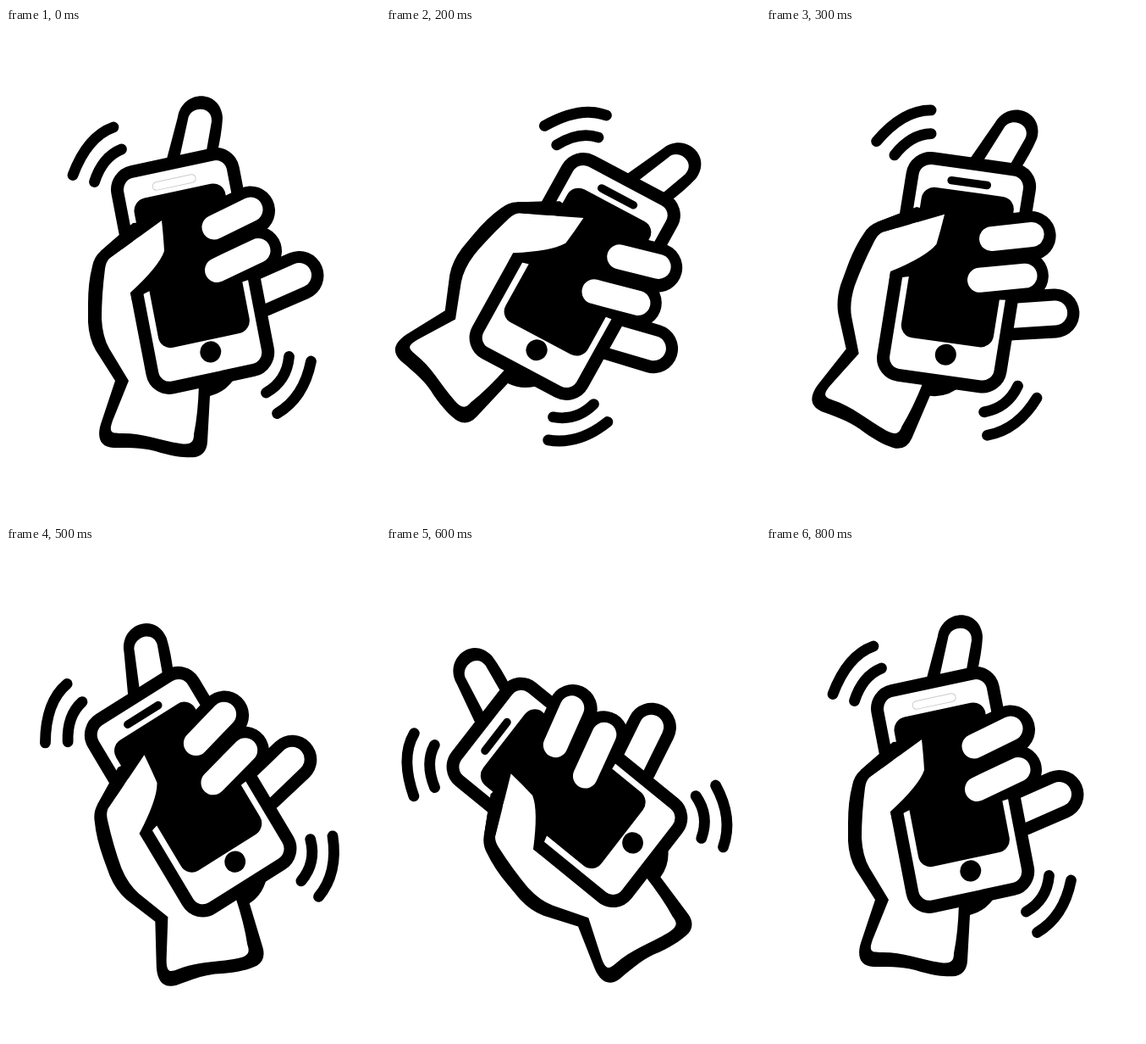
These frames come from a looping animation (442x579 px, 0.9 s). An HTML page:

```html
<!DOCTYPE html>
<html lang="en">
<head>
<meta charset="utf-8">
<title>Shaking phone</title>
<style>
  html, body { margin: 0; width: 100%; height: 100%; overflow: hidden; background: #fff; }
  svg { display: block; width: 442px; height: 579px; }
  .line { fill: none; stroke: #000; stroke-linecap: round; }
  .outer { stroke-width: 58; }
  .inner { stroke: #fff; stroke-width: 29; }
  .wave { stroke-width: 12.8; }
  .white { fill: #fff; }
</style>
</head>
<body>
<svg viewBox="0 0 442 579">
  <g id="figure">
    <!-- motion marks -->
    <g class="line wave">
      <path d="M127 117Q96 128 79 173.5"/>
      <path d="M136.5 143Q114 152 104.5 181.5"/>
      <path d="M334.5 387.5Q332 416 307.5 430"/>
      <path d="M360.5 393Q352 436 320.5 454.5"/>
    </g>

    <!-- fingers behind the phone -->
    <path d="M188 162L203 105C209 72 254 72 256 106Q255 125 249 150Z"/>
    <path class="white" d="M204 158L215 108C217 92 244 91 243 110L236 150Z"/>
    <path class="line outer" d="M300 312L346.5 292"/>
    <path class="line inner" d="M300 312L346.5 291.5"/>

    <!-- palm and wrist -->
    <path d="M150 230L112 263Q104 270 102 281Q97 300 97 325V347Q98 366 106 380L129 416L112 467C107 484 112 494 127 495C150 495 166 495 183 501C202 506 214 507 224 506Q237 503 238 488L241 434Q262 429 273 408L200 330Z"/>
    <path class="white" d="M184 227L122 272Q118 276 117 284Q113 315 113 343Q114 364 122 378L145 416L126 463C121 477 125 478 134 478C160 477 180 486 206 490C219 492 222 488 222 479Q227 455 228 420L180 320Z"/>

    <!-- phone -->
    <g transform="translate(220 282) rotate(-12.1) skewX(-1.2)">
      <rect x="-70" y="-125" width="139.5" height="259" rx="21" fill="#fff" stroke="#000" stroke-width="15"/>
      <rect x="-55" y="-91.5" width="110" height="179.5" rx="15"/>
      <rect id="speaker" x="-28" y="-107" width="52" height="9.5" rx="4.7"/>
      <circle cx="2.5" cy="102.3" r="12.5"/>
    </g>

    <!-- fingers in front -->
    <path class="line outer" d="M249 235L289 215.5M252 278L297 263"/>
    <path class="line inner" d="M246 235L289 214M249.5 285.5L298 262.5"/>

    <!-- thumb -->
    <path d="M184 227L150 230L112 263L122 272Z"/>
    <path d="M187 263L190 300L164 313L149 322L147 312Z"/>
    <path class="white" d="M184 227L122 272L120 300L147 312Q181 281 187 263Q186 245 184 227Z"/>
  </g>
</svg>
<script>
  const STEP = 100;
  const angles = [0, 20, 40, 20, 0, -20, -40, -20, 0];
  const centers = {
    "0": [220.5, 282],
    "20": [226.5, 284],
    "40": [226, 289.5],
    "-20": [216.5, 284.5],
    "-40": [211, 286]
  };
  const figure = document.getElementById("figure");
  const speaker = document.getElementById("speaker");

  function draw(time) {
    const angle = angles[Math.floor(time / STEP) % angles.length];
    const [x, y] = centers[angle];
    figure.setAttribute("transform", `translate(${x} ${y}) rotate(${angle}) translate(-220.5 -282)`);
    // the speaker is only a faint outline in the resting pose
    speaker.setAttribute("fill", angle ? "#000" : "#fff");
    speaker.setAttribute("stroke", angle ? "none" : "#ccc");
  }

  const start = performance.now();
  function tick() {
    draw(performance.now() - start);
    requestAnimationFrame(tick);
  }
  tick();
</script>
</body>
</html>
```
